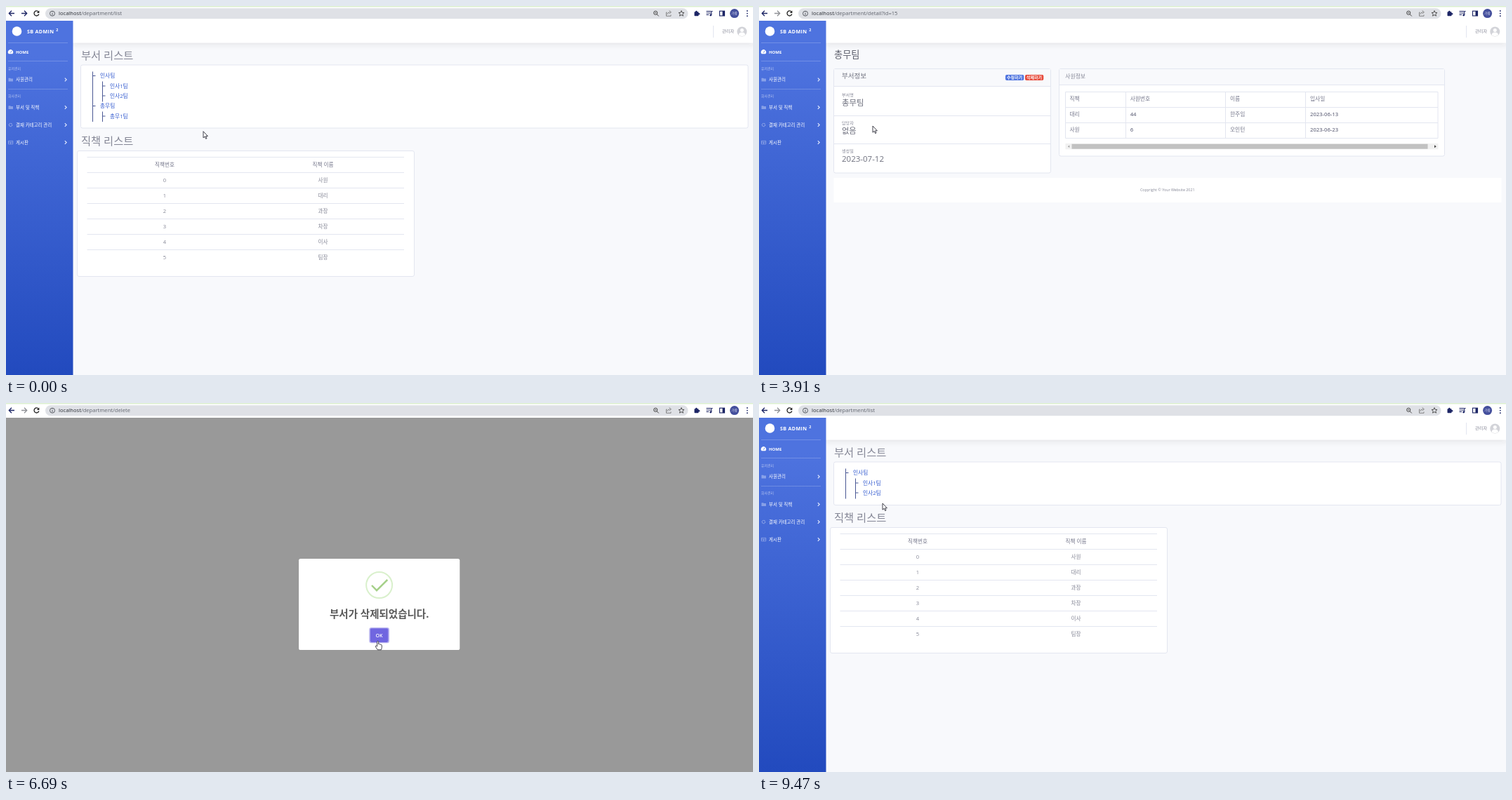
Write an HTML page that moves like this. It is 1064x526 px and loops after 9.82 s.

```html
<!DOCTYPE html>
<html lang="ko">
<head>
<meta charset="utf-8">
<title>Department admin</title>
<style>
html, body { margin: 0; width: 100%; height: 100%; overflow: hidden; background: #fff; }
svg { display: block; font-family: "Open Sans", "Noto Sans CJK KR", "Noto Sans CJK", sans-serif; }
</style>
</head>
<body>
<svg id="stage" width="1064" height="526" viewBox="0 0 1064 526"></svg>
<script>
const LOOP = 9820;
const GREY = '#858796', DARK = '#5a5c69', LINE = '#e3e6f0', NAVY = '#1c2565', BLUE = '#3159cf';
const ROW_H = 22, LOWER_SHIFT = -29;

// Markup helpers; text is placed by its vertical centre.
const text = (x, cy, size, str, fill = GREY, more = '') =>
  `<text x="${x}" y="${(cy + size * .37).toFixed(2)}" font-size="${size}" fill="${fill}" ${more}>${str}</text>`;
const rect = (x, y, w, h, fill, more = '') =>
  `<rect x="${x}" y="${y}" width="${w}" height="${h}" fill="${fill}" ${more}/>`;
const path = (d, stroke, width = 1, more = '') =>
  `<path d="${d}" fill="none" stroke="${stroke}" stroke-width="${width}" ${more}/>`;
const dot = (x, y, r, fill, more = '') => `<circle cx="${x}" cy="${y}" r="${r}" fill="${fill}" ${more}/>`;
const group = (id, body, more = '') => `<g id="${id}" ${more}>${body}</g>`;
const card = (x, y, w, h) => rect(x, y, w, h, '#fff', `stroke="${LINE}" rx="2.5"`);
const MID = 'text-anchor="middle"', BOLD = 'font-weight="700"', SEMI = 'font-weight="600"';

function toolbar() {
  return rect(0, 0, 1064, 21, '#fff') + rect(0, 0, 1064, 1.5, '#dcefd0') +
    path('M12 10.5H4.5M8 6.8L4.3 10.5L8 14.2', NAVY, 1.3) +
    path('M22 10.5H29.5M26 6.8L29.7 10.5L26 14.2', NAVY, 1.3, 'id="forward"') +
    group('reload', path('M46.3 8.3A3.5 3.5 0 1 0 46.9 11.5', '#222', 1.3) + '<path d="M47.4 6.4V10H43.8Z" fill="#222"/>') +
    path('M40.5 7.5L46.5 13.5M46.5 7.5L40.5 13.5', '#222', 1.3, 'id="stop"') +
    rect(56, 3.2, 915.5, 15, '#dfe1e6', 'rx="7.5"') +
    dot(66, 10.7, 3.5, 'none', 'stroke="#4a4d55" stroke-width=".9"') + path('M66 10V12.8M66 8.4V9.2', '#4a4d55', .9) +
    `<text x="75" y="13.3" font-size="7.55" font-family="Noto Sans, sans-serif" fill="#666a73"><tspan fill="#33363d">localhost</tspan><tspan id="url"></tspan></text>` +
    dot(925.2, 9.8, 2.6, 'none', 'stroke="#444" stroke-width="1"') + path('M927 11.7L929.8 14.5M924 9.8H926.4', '#444', 1) +
    path('M941.5 9H940.5V14.3H947V12.5M942 12Q942.3 8.8 945.5 8.8M944.7 6.6L947.4 8.8L944.7 11', '#777', .9) +
    '<path d="M962 6.6L963.1 9.3L966 9.5L963.8 11.4L964.5 14.2L962 12.7L959.5 14.2L960.2 11.4L958 9.5L960.9 9.3Z" fill="none" stroke="#444" stroke-width=".9"/>' +
    rect(980.5, 8.3, 6, 6, NAVY, 'rx=".8"') + dot(983.3, 8, 1.3, NAVY) + dot(987, 11.2, 1.3, NAVY) +
    path('M997.5 7.5H1004M997.5 10H1004M997.5 12.5H1001M1004.8 13V7.5H1006.5', NAVY, 1.1) + dot(1003.7, 13, 1.4, NAVY) +
    rect(1016.5, 7.2, 7, 6.8, 'none', `stroke="${NAVY}" stroke-width="1.1"`) + rect(1020.5, 7, 3.2, 7, NAVY) +
    dot(1037.6, 10.6, 6.5, '#444f9c') + text(1037.6, 10.6, 4.6, '가람', '#dfe2f5', MID) +
    [7, 10.6, 14.2].map(y => dot(1055.8, y, .95, '#222c6b')).join('');
}

function shell() {
  const folder = y => `<path d="M3.5 ${y - 2.3}H6L7 ${y - 1.4}H10V${y + 2.6}H3.5Z" fill="#fff" opacity=".35"/>`;
  const item = (y, label) => text(14, y, 6.5, label, '#fff') +
    path(`M83.8 ${y - 2.4}L86.2 ${y}L83.8 ${y + 2.4}`, '#e6ecff', 1.1);
  return rect(0, 21, 1064, 505, '#f8f9fc') +
    rect(95, 21, 969, 31.5, '#fff', 'filter="url(#shadow)"') +
    rect(0, 21, 95.5, 505, 'url(#side)') + rect(0, 0, 1064, 21, '#fff') +
    dot(15.5, 36, 6.8, '#fff') +
    text(30, 36, 7.2, 'SB ADMIN', '#fff', BOLD + ' letter-spacing=".3"') + text(71.3, 34, 5.4, '2', '#fff', BOLD) +
    [52.5, 78.5, 118.5].map(y => path(`M3 ${y}H88`, '#fff', 1, 'opacity=".2"')).join('') +
    '<path d="M3.8 68.2A3.6 3.6 0 1 1 9.2 68.2Z" fill="#fff"/>' + path('M6.5 66.8L8 63.8', '#4e73df', .8) +
    text(14, 65.5, 6, 'HOME', '#fff', BOLD) +
    text(3, 89, 4.9, '유저관리', '#fff', 'opacity=".6"') + text(3, 128.5, 4.9, '회사관리', '#fff', 'opacity=".6"') +
    folder(105) + item(105, '사원관리') + folder(144.5) + item(144.5, '부서 및 직책') +
    dot(6.5, 169.5, 2.2, 'none', 'stroke="#fff" stroke-width="1.3" stroke-dasharray="1.4 .6" opacity=".4"') +
    item(169.5, '결재 카테고리 관리') +
    path('M3.5 192.3H9.8V196.8H3.5ZM3.5 194.2H9.8M6.6 194V196.8', '#fff', .8, 'opacity=".4"') + item(194.5, '게시판') +
    path('M1007.5 28V45', LINE) + text(1020, 36, 6.2, '관리자') +
    dot(1048.3, 36.5, 7, '#d3d4d9') + dot(1048.3, 34.4, 2.5, '#fff') +
    '<path d="M1043.7 41.5Q1043.7 37.6 1048.3 37.6T1052.9 41.5Q1048.3 44.5 1043.7 41.5Z" fill="#fff"/>';
}

function listPage() {
  const branch = (x, y, label, more) => path(`M${x} ${y}H${x + 4}`, '#4a5894') + text(x + 10.5, y, 7.7, label, BLUE, more);
  const head = SEMI.replace('600', '500');
  const ranks = ['사원', '대리', '과장', '차장', '이사', '팀장'];
  const rows = ranks.map((rank, i) => {
    const y = 248 + i * 21.95;
    return path(`M115.5 ${237.5 + i * ROW_H}H567`, LINE) +
      text(226, y, 7.6, i, GREY, MID) + text(451.5, y, 7.6, rank, GREY, MID);
  }).join('');
  return text(107, 70.5, 15.3, '부서 리스트', GREY, 'font-weight="300"') +
    group('treeBox', card(106.5, 84, 950.5, 90)) +
    path('M123.5 93.5V136.5M137.5 107.5V136.5', '#4a5894') +
    branch(123.5, 99.5, '인사팀') + branch(137.5, 114, '인사1팀') + branch(137.5, 128, '인사2팀') +
    group('lastDept', path('M123.5 136V165M137.5 150.5V165', '#4a5894') +
      branch(123.5, 142.5, '총무팀', 'id="deptLink"') + branch(137.5, 157, '총무1팀')) +
    group('lower', text(107, 192, 15.3, '직책 리스트', GREY, 'font-weight="300"') +
      card(101.5, 206.5, 480, 179) + rect(115.5, 0, 451.5, ROW_H, '#ececef', 'id="hoverRow"') +
      path('M115.5 215.5H567', LINE) +
      text(226, 226, 7.6, '직책번호', '#74768a', MID + ' ' + head) + text(451.5, 226, 7.6, '직책 이름', '#74768a', MID + ' ' + head) + rows);
}

function detailPage() {
  const field = (y, label, value, size) => text(118, y, 6.1, label) + text(118, y + 10.7, size, value, '#6e707e');
  const badge = (x, label, fill) => rect(x, 98, 26.3, 8, fill, 'rx="2"') + text(x + 13.1, 102, 6, label, '#fff', MID + ' ' + BOLD);
  const cols = [442.5, 528.7, 671, 785];
  const cells = [
    ['직책', '사원번호', '이름', '입사일'],
    ['대리', '44', '한주임', '2023-06-13'],
    ['사원', '6', '오인턴', '2023-06-23']
  ].map((row, r) => row.map((s, c) =>
    text(cols[c], 132.5 + r * ROW_H, 7.7, s, '#74768a', r && c % 2 ? SEMI : '')).join('')).join('');
  return text(107, 69.5, 13.2, '총무팀', DARK, 'font-weight="300"') +
    card(106.5, 89.5, 309, 148.5) + rect(107, 90, 308, 24, '#f8f9fc') +
    path('M107 114.5H415M107 156.5H415M107 196.5H415', LINE) +
    text(118, 99.5, 9.5, '부서정보', '#6e707e') +
    badge(351, '수정하기', '#4e73df') + badge(379, '삭제하기', '#e74a3b') +
    field(127.2, '부서명', '총무팀', 11.4) + field(167.2, '담당자', '없음', 11.2) + field(207.2, '생성일', '2023-07-12', 11.5) +
    card(427.5, 89.5, 549, 124.5) + rect(428, 90, 548, 22.5, '#f8f9fc') + path('M428 112.5H976', LINE) +
    text(436.3, 100, 7.8, '사원정보') +
    path('M436.5 122.5H967V188.5H436.5ZM436.5 144.5H967M436.5 166.5H967M522.5 122.5V188.5M664.5 122.5V188.5M778.5 122.5V188.5', LINE) + cells +
    rect(436.5, 196, 531, 8.3, '#f1f1f1') + rect(445.5, 196.7, 507, 7, '#c1c1c1') +
    '<path d="M442.3 198.4V202L439.8 200.2Z" fill="#a3a3a3"/><path d="M962 198.2V202.2L964.8 200.2Z" fill="#444"/>' +
    rect(106.5, 245, 951, 35, '#fff') +
    text(581.7, 262.5, 5.35, 'Copyright © Your Website 2021', GREY, MID);
}

function modal() {
  return rect(0, 21, 1064, 505, '#fff') + rect(0, 21, 1064, 505, '#000', 'id="shade"') +
    group('popup', rect(417, 222, 229.3, 130, '#fff', 'rx="2.6"') +
      dot(531.6, 259.6, 18.5, 'none', 'stroke="#a5dc86" stroke-opacity=".42" stroke-width="2"') +
      path('M521 260L528 267.2L543.3 252', '#a5d089', 2.5, 'id="tick" pathLength="1" stroke-dasharray="1 1"') +
      text(531.7, 301, 14.5, '부서가 삭제되었습니다.', '#595959', MID + ' ' + BOLD) +
      rect(518, 320.7, 27.2, 20.8, 'none', 'id="ring" rx="2.5" stroke="#b7b2ef" stroke-width="1.5"') +
      rect(518.7, 321.3, 25.8, 19.6, '#7066e0', 'id="okBox" rx="1.8"') +
      text(531.6, 331.2, 7, 'OK', '#fff', MID + ' ' + SEMI));
}

const stage = document.getElementById('stage');
stage.innerHTML =
  `<defs><linearGradient id="side" x1="0" y1="0" x2="0" y2="1">
    <stop offset=".1" stop-color="#4e73df"/><stop offset="1" stop-color="#224abe"/></linearGradient>
  <filter id="shadow" x="-5%" y="-80%" width="110%" height="300%">
    <feDropShadow dx="0" dy="1.3" stdDeviation="4.5" flood-color="#3a3b45" flood-opacity=".15"/></filter></defs>` +
  group('shell', shell()) + group('list', listPage()) + group('detail', detailPage()) + group('modal', modal()) +
  toolbar() +
  group('cursor',
    '<path id="arrow" d="M0 0V9.2L2.1 7.3L3.6 10.6L5 10L3.6 6.8H6.4Z" fill="#fff" stroke="#23232f" stroke-width=".85" stroke-linejoin="round"/>' +
    '<path id="hand" d="M-1.1 7.2V.9Q-1.1 0 -.1 0T.9 .9V4.2Q1.9 3.6 2.5 4.5Q3.5 4 4.1 5Q5.5 4.7 5.6 6.2V8.9Q5.4 10.8 4.6 12.3H-.4L-3.1 8.3Q-3.8 7.2 -3 6.6Q-2.2 6.2 -1.1 7.6Z" fill="#fff" stroke="#23232f" stroke-width=".85" stroke-linejoin="round"/>');

const el = {};
stage.querySelectorAll('[id]').forEach(node => el[node.id] = node);

// Cursor keys: time, x, y
const MOVES = [
  [0, 281, 178.7], [990, 281, 178.7], [1400, 215, 164], [1820, 158.5, 144.5], [2020, 158, 144.3],
  [2170, 149.5, 142.5], [2480, 149.5, 142.5], [2950, 161, 141], [3240, 161, 141],
  [3400, 145, 93], [3560, 129, 112], [3750, 176, 155], [3910, 162, 171], [4390, 162, 171],
  [4650, 285, 135], [4880, 421, 108], [5100, 391.7, 102.5], [5920, 391.7, 102.5],
  [6200, 455, 215], [6620, 529.7, 339.5], [7170, 529.7, 339.5], [7380, 537, 343], [7520, 537, 343],
  [7840, 512, 306], [8250, 300, 210], [8680, 121, 139], [8940, 121, 139], [9260, 181, 142], [9470, 176, 143]
];
const POP = [[5940, .7], [6075, 1.05], [6180, .95], [6240, 1]];

const clamp = v => Math.max(0, Math.min(1, v));
const ramp = (t, from, to) => clamp((t - from) / (to - from));
const smooth = k => k * k * (3 - 2 * k);

function sample(keys, t) {
  const i = keys.findIndex(k => k[0] > t);
  if (i < 0) return keys[keys.length - 1].slice(1);
  if (i === 0) return keys[0].slice(1);
  const a = keys[i - 1], b = keys[i], k = smooth(ramp(t, a[0], b[0]));
  return a.slice(1).map((v, n) => v + (b[n + 1] - v) * k);
}

const show = (node, on) => node.setAttribute('visibility', on ? 'visible' : 'hidden');
const display = (node, on) => node.style.display = on ? '' : 'none';
const inside = (x, y, l, t, r, b) => x >= l && x <= r && y >= t && y <= b;
const during = (t, from, to) => t >= from && t < to;

function render(t) {
  const [x, y] = sample(MOVES, t);
  const page = t < 2500 ? 'list' : t < 5940 ? 'detail' : t < 7520 ? 'modal' : 'list';
  const removed = t >= 7520;
  ['list', 'detail', 'modal'].forEach(id => display(el[id], id === page));
  display(el.shell, page !== 'modal');

  el.url.textContent = '/department/' +
    (t < 2280 || removed ? 'list' : t < 5210 ? 'detail?id=15' : 'delete');
  const loading = during(t, 2280, 2640) || during(t, 5210, 5480) || during(t, 7240, 7700);
  display(el.stop, loading);
  display(el.reload, !loading);
  el.forward.setAttribute('stroke', t < 2500 ? NAVY : '#8f9196');

  let hot = false;
  if (page === 'list') {
    display(el.lastDept, !removed);
    el.treeBox.firstChild.setAttribute('height', removed ? 61.5 : 90);
    const shift = removed ? LOWER_SHIFT : 0;
    el.lower.setAttribute('transform', `translate(0 ${shift})`);
    hot = !removed && inside(x, y, 134, 138, 156, 149);
    el.deptLink.setAttribute('text-decoration', hot ? 'underline' : 'none');
    el.deptLink.setAttribute('fill', hot ? '#224abe' : BLUE);
    const row = Math.floor((y - shift - 237.5) / ROW_H);
    const onRow = inside(x, row, 116, 0, 567, 5);
    show(el.hoverRow, onRow);
    if (onRow) el.hoverRow.setAttribute('y', 237.5 + row * ROW_H);
  } else if (page === 'detail') {
    hot = inside(x, y, 351, 98, 405, 106);
  } else {
    hot = inside(x, y, 518, 321, 545, 341);
    const fade = ramp(t, 7240, 7380);
    el.shade.setAttribute('opacity', .4 * ramp(t, 5900, 6000) - .322 * fade);
    const scale = sample(POP, t)[0];
    el.popup.setAttribute('transform',
      `translate(531.6 ${287 - 2 * fade}) scale(${scale}) translate(-531.6 -287)`);
    el.popup.setAttribute('opacity', ramp(t, 5900, 6040));
    el.tick.setAttribute('stroke-dashoffset', 1 - smooth(ramp(t, 6150, 6550)));
    show(el.tick, t > 6150);
    show(el.ring, t < 7240);
    el.okBox.setAttribute('fill', during(t, 6900, 7100) ? '#5a52b3' : '#7066e0');
    el.okBox.setAttribute('opacity', 1 - .58 * fade);
  }

  el.cursor.setAttribute('transform', `translate(${x.toFixed(2)} ${y.toFixed(2)})`);
  display(el.hand, hot);
  display(el.arrow, !hot);
}

const start = performance.now();
function tick() {
  render((performance.now() - start) % LOOP);
  requestAnimationFrame(tick);
}
tick();
</script>
</body>
</html>
```
